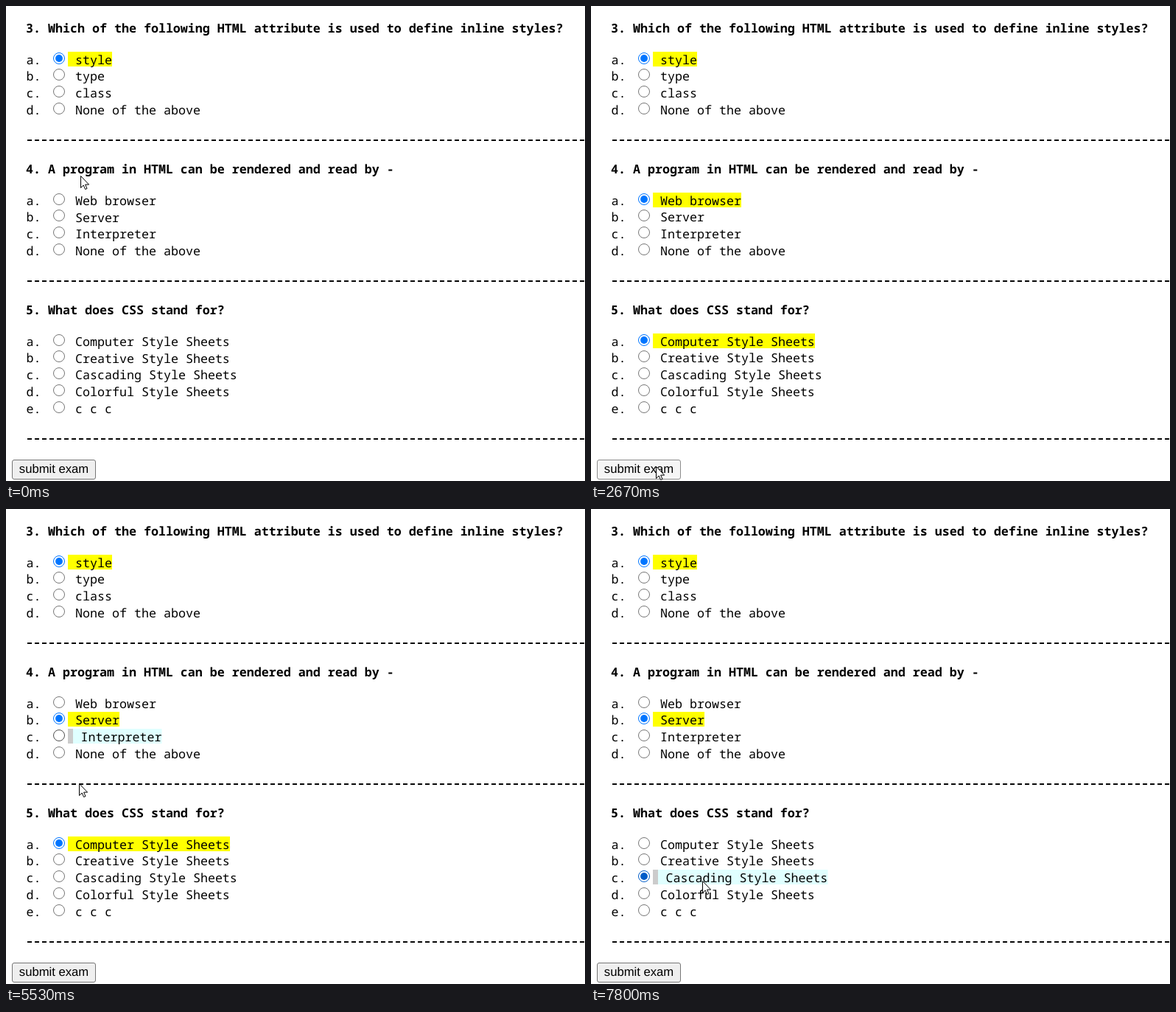
Animation, 786 px wide and 644 px high, one loop 8 s. Source, as an HTML page:

```html
<!DOCTYPE html>
<html lang="en">
<head>
<meta charset="utf-8">
<title>HTML quiz</title>
<style>
  html, body { margin: 0; width: 100%; height: 100%; overflow: hidden; background: #fff; }
  svg { display: block; }
  text { white-space: pre; text-rendering: geometricPrecision; }
  .mono { font: 500 16.667px "Noto Sans Mono", "DejaVu Sans Mono", monospace; }
  .bold { font-weight: 700; }
  .ui { font: 16.667px "Liberation Sans", Arial, sans-serif; }
</style>
</head>
<body>
<svg width="786" height="644" viewBox="0 0 786 644">
  <g id="page"></g>
  <g id="live"></g>
  <path id="cursor" d="M.5 .5V16.5L4.2 13L6.6 18.5L9 17.5L6.6 12.1H11.6Z" fill="#fff" stroke="#000"/>
</svg>
<script>
const LOOP = 8000;
const CHAR = 10;
const LEFT = 84;
const PRESS = 70;
const NONE = 'None of the above';

// picks: [time, option]
const questions = [
  { title: '3. Which of the following HTML attribute is used to define inline styles?',
    options: ['style', 'type', 'class', NONE], answer: 0, picks: [[0, 0]] },
  { title: '4. A program in HTML can be rendered and read by -',
    options: ['Web browser', 'Server', 'Interpreter', NONE], answer: 0,
    picks: [[670, 0], [4800, 1]] },
  { title: '5. What does CSS stand for?',
    options: [...['Computer', 'Creative', 'Cascading', 'Colorful'].map(w => w + ' Style Sheets'), 'c c c'],
    answer: 2, picks: [[1730, 0], [7800, 2]] }
];
questions.forEach((q, i) => { q.y = 36 + 191 * i; });
const graded = [[2730, 4800], [6400, 7800]];

// Pointer moves, in ticks of 1/15 s; a skew below 1 brings the fast part forward.
const home = { x: 101, y: 230 };
const moves = [
  { from: 0, to: 2, x: 101, y: 245 },
  { from: 3, to: 5, x: 101, y: 264 },
  { from: 11, to: 22, x: 110, y: 461, skew: 0.9 },
  { from: 26, to: 35, x: 90, y: 621, skew: 0.97 },
  { from: 36, to: 37, x: 88, y: 624 },
  { from: 44, to: 58, x: 93, y: 306, skew: 0.61 },
  { from: 65, to: 67, x: 94, y: 289 },
  { from: 82, to: 89, x: 111, y: 632, skew: 0.586 },
  { from: 97, to: 107, x: 150, y: 513, skew: 0.8 },
  { from: 108, to: 112, x: 151, y: 504, skew: 0.6 }
];

const $ = id => document.getElementById(id);
const during = (t, a, b) => t >= a && t < b;
const mix = (a, b, p) => a + (b - a) * p;
const smooth = p => p * p * (3 - 2 * p);
const text = (x, y, s, cls) => `<text class="${cls}" x="${x}" y="${y}">${s}</text>`;
const rect = (x, y, w, h, fill) => `<rect x="${x}" y="${y}" width="${w}" height="${h}" fill="${fill}"/>`;
const stroke = (d, color, width) =>
  `<path d="${d}" fill="none" stroke="${color}" stroke-width="${width}" stroke-linecap="round" stroke-linejoin="round"/>`;
const rowY = (q, i) => q.y + 35 + Math.floor(22.75 * i);

function pointer(tick) {
  let { x, y } = home;
  for (const m of moves) {
    if (tick <= m.from) break;
    const p = Math.min(1, (tick - m.from) / (m.to - m.from));
    const e = smooth(p ** (m.skew ?? 1));
    x = mix(x, m.x, Math.min(1, 1.2 * e));
    y = mix(y, m.y, e);
  }
  return [x, y];
}

function radio(cy, on, hover, press) {
  const plain = press ? '#8d8d8d' : hover ? '#4f4f4f' : '#767676';
  const blue = press ? '#3793ff' : hover ? '#005cc8' : '#0075ff';
  const ring = `<circle cx="72" cy="${cy}" r="7.5" fill="#fff" stroke="${on ? blue : plain}"/>`;
  return ring + (on ? `<circle cx="72" cy="${cy}" r="4.9" fill="${blue}"/>` : '');
}

function mark(x, cy, right) {
  if (right) {
    const d = `M${x + 7} ${cy + 2.5}L${x + 11.5} ${cy + 6.5}Q${x + 16} ${cy - 1} ${x + 23} ${cy - 4.5}`;
    return stroke(d, '#3f8f3c', 3.6) + stroke(d, '#62ae55', 2);
  }
  const d = `M${x + 9} ${cy - 5.5}L${x + 21.5} ${cy + 7}M${x + 21.5} ${cy - 5.5}L${x + 9} ${cy + 7}`;
  return stroke(d, '#d93a3f', 4) + stroke(d, '#f8484c', 2.6);
}

function option(q, i, t, [px, py]) {
  const cy = rowY(q, i);
  const label = q.options[i];
  const pick = q.picks.filter(p => p[0] <= t).pop();
  const on = !!pick && pick[1] === i;
  const right = i === q.answer;
  const marked = (on || right) && graded.some(([a, b]) => during(t, a, b));
  const end = LEFT + CHAR * (label.length + 1);
  const width = end - LEFT + (marked ? 25 : 0);
  const hover = during(px, LEFT, LEFT + width) && during(py, cy - 9, cy + 11);
  const press = hover && q.picks.some(p => during(t, p[0] - PRESS, p[0]));
  const shift = hover ? 7.5 : 0;
  const fill = hover ? '#e0ffff' : marked ? (right ? '#adff2f' : '#ffd5d5') : on ? '#ffff00' : '';
  const drop = i === 1 && !pick ? 1 : 0;

  let out = radio(cy, on, hover, press);
  if (fill) out += rect(LEFT, cy - 9, width + shift, 20, fill);
  if (hover) out += rect(LEFT, cy - 9, 7, 20, '#ccc');
  out += text(LEFT + CHAR + shift, cy + 8 + drop, label, 'mono');
  return out + (marked ? mark(end + shift, cy, right) : '');
}

function button(t, [px, py]) {
  const hover = during(px, 8, 122) && during(py, 615, 642);
  const press = graded.some(([a]) => during(t, a - PRESS, a));
  const fill = press ? '#f5f5f5' : hover ? '#e5e5e5' : '#efefef';
  const edge = press ? '#8d8d8d' : hover ? '#4f4f4f' : '#767676';
  return `<rect x="8.5" y="615.5" width="113" height="26" rx="2.5" fill="${fill}" stroke="${edge}"/>`
    + text(17.8, 633, 'submit exam', 'ui');
}

function drawPage() {
  $('page').innerHTML = questions.map(q => {
    const letters = q.options.map((_, i) => text(27.5, rowY(q, i) + 8, 'abcde'[i] + '.', 'mono'));
    const rule = rowY(q, q.options.length - 1) + 43;
    return text(27, q.y, q.title, 'mono bold') + letters.join('')
      + `<path d="M29 ${rule}H786" stroke="#000" stroke-width="2" stroke-dasharray="6 4"/>`;
  }).join('');
}

const tickTime = n => Math.round(n * 20 / 3) * 10;
let shown = -1;

function render(t) {
  let tick = Math.floor(t * 0.015 + 0.1);
  if (tickTime(tick) > t) tick--;
  if (tick === shown) return;
  shown = tick;
  const now = tickTime(tick);
  const [x, y] = pointer(tick).map(Math.round);
  const felt = pointer(tick - 0.75); // hover trails the pointer slightly
  $('live').innerHTML = questions.map(q =>
    q.options.map((_, i) => option(q, i, now, felt)).join('')).join('') + button(now, felt);
  $('cursor').setAttribute('transform', `translate(${x} ${y})`);
}

drawPage();
render(0);
const begin = performance.now();
function frame() {
  render((performance.now() - begin) % LOOP);
  requestAnimationFrame(frame);
}
requestAnimationFrame(frame);
</script>
</body>
</html>
```
